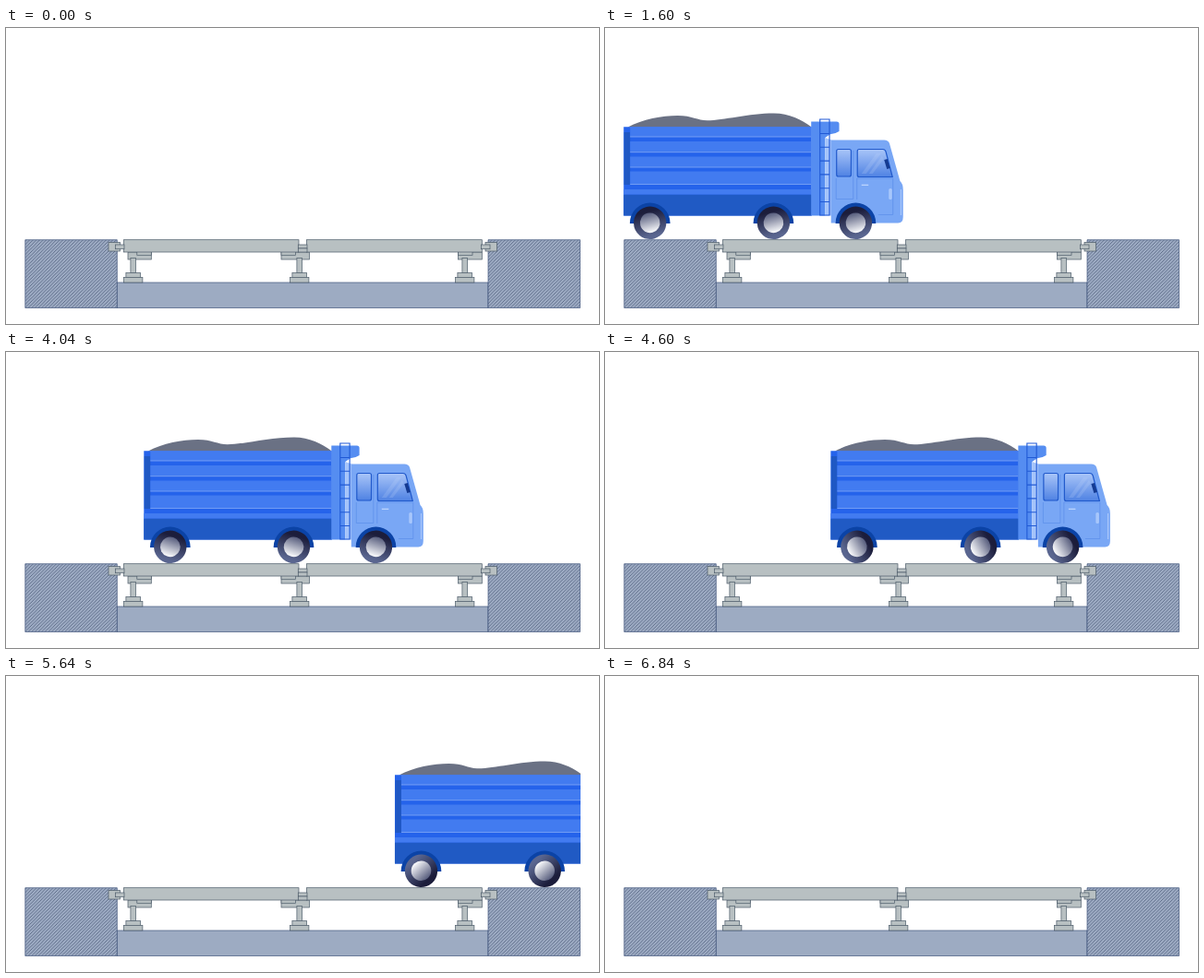
An HTML page for the animation above (7120 ms loop, 642 by 321 pixels).

```html
<!DOCTYPE html>
<html lang="en">
<head>
<meta charset="utf-8">
<title>Weighbridge</title>
<style>
html, body { margin: 0; width: 100%; height: 100%; overflow: hidden; background: #fff; }
svg { display: block; width: 100vw; height: 100vh; }
.steel { fill: #b8c0c2; stroke: #4b5a68; stroke-width: .7; }
</style>
</head>
<body>
<svg viewBox="0 0 642 321">
  <defs>
    <pattern id="hatch" width="3.6" height="3.6" patternUnits="userSpaceOnUse">
      <rect width="3.6" height="3.6" fill="#9fadc5"/>
      <path d="M-1 1L1-1M-1 4.600L4.600-1M2.600 4.600L4.600 2.600" stroke="#40506f" stroke-width=".7"/>
    </pattern>
    <linearGradient id="tyre"><stop offset=".1" stop-color="#5a6690"/><stop offset=".85" stop-color="#1c1d3b"/></linearGradient>
    <linearGradient id="hub"><stop offset=".05" stop-color="#f4f5f8"/><stop offset="1" stop-color="#565c7c"/></linearGradient>
    <linearGradient id="glass" x2="0" y2="1"><stop offset="0" stop-color="#a9c5f8"/><stop offset="1" stop-color="#4f82e3"/></linearGradient>
    <clipPath id="road"><rect x="20" y="80" width="602" height="160"/></clipPath>
  </defs>

  <g stroke="#40547c" stroke-width=".7">
    <path d="M120 276H522V303.500H120Z" fill="#9dabc2"/>
    <path d="M20.800 229.700H120.300V303.500H20.800ZM522 229.700H621.500V303.500H522Z" fill="url(#hatch)"/>
  </g>
  <g id="bridge" class="steel"></g>

  <g clip-path="url(#road)">
    <g id="truck">
      <path d="M147 107.500C163 99 184 95 201 95C217 95 222 100.300 233 100.300C250 100.300 278 92.500 305 92.500C322 92.500 335 99.500 346 107.500Z" fill="#6a7184"/>
      <path d="M142.500 107.200H346V203.500H142.500Z" fill="#2563eb"/>
      <path d="M142.500 180.500H346V203.500H142.500Z" fill="#205ac4"/>
      <path d="M143 113H149.500V170H143Z" fill="#1f58c4"/>
      <g id="slats" fill="#427bf0"></g>
      <path d="M142.500 175H346V180.500H142.500Z" fill="#427bf0"/>
      <path d="M345.500 101.500H373Q375.800 101.500 375.800 104V112Q372 114.800 366 115.200L360.500 119V203.500H345.500Z" fill="#558df1"/>
      <path d="M360.500 119L367.500 121.500V203.500H360.500Z" fill="#a5c4fa"/>
      <path id="ladder" fill="none" stroke="#2059d5" stroke-width="1.100"/>

      <path d="M367 121.500H424.500Q429 121.500 430.200 125L441.700 166Q445 169 445 175V205Q445 211.500 439.500 211.500H367Z" fill="#79a7f5"/>
      <path d="M442.700 175V203" stroke="#a9c7fb" stroke-width="1.200"/>
      <path d="M372.500 163V185.500H391V133M395 163V186M395 163H434V202.500H418" fill="none" stroke="#5e91eb" stroke-width=".8"/>
      <g fill="url(#glass)" stroke="#2059cb" stroke-width="1.200">
        <rect x="373" y="131.500" width="15.700" height="29.500" rx="2"/>
        <path d="M397.500 131.500H423Q425.500 131.500 426.300 134L433.500 161.500H397.500Q395.500 161.500 395.500 159.500V133.500Q395.500 131.500 397.500 131.500Z"/>
      </g>
      <path d="M400 158L416 136H421L405 158ZM408 158L422 139L424 142L412 158Z" fill="#c4d8fb" opacity=".2"/>
      <path d="M424.500 143L428 142L431 152L427.500 153Z" fill="#143a91"/>
      <path d="M400 170.300H407.500" stroke="#c2d8fd" stroke-width="1.200"/>
      <rect x="429.500" y="174" width="3.500" height="12" rx="1.500" fill="#a8c7fb"/>
      <g id="wheels"></g>
    </g>
  </g>
</svg>
<script>
const byId = id => document.getElementById(id);
const rect = (x, y, x2, y2) => `<rect x="${x}" y="${y}" width="${x2 - x}" height="${y2 - y}"/>`;

// Support under the deck: bracket, pad, stem and two foot plates
const support = (mid, left, right, pad) =>
  rect(left, 243, right, 251) + rect(pad, 242, pad + 15.5, 246.3) +
  rect(mid - 2.8, 249.5, mid + 2.8, 266) + rect(mid - 7.8, 265.5, mid + 7.8, 271) +
  rect(mid - 10.2, 270.5, mid + 10.2, 276);

byId('bridge').innerHTML =
  rect(111, 232.5, 123.5, 242) + rect(519, 232.5, 531.5, 242) +
  support(137.7, 132, 157.3, 141.8) + support(317.7, 298, 328.5, 298) + support(496.7, 489.5, 515.3, 489.5) +
  rect(127.5, 229.7, 317, 243) + rect(325.5, 229.7, 515.3, 243) +
  rect(118.5, 235, 128, 239.7) + rect(514.5, 235, 524, 239.7) +
  rect(316.3, 235, 326, 239) + rect(316.3, 239, 326, 243);

byId('slats').innerHTML = [[107.5, 118], [123, 134.7], [139.5, 151], [155.5, 169.5]].map(([y, y2]) =>
  rect(149.5, y, 345.5, y2) + `<path d="M149.5 ${y2}H345.5" stroke="#8db1f6" stroke-width=".7"/>`).join('');

let ladder = 'M355 203V99H365.3V203Z';
for (let y = 114.5; y < 200; y += 14.8) ladder += `M355 ${y}H365.3`;
byId('ladder').setAttribute('d', ladder);

byId('wheels').innerHTML = [171, 304.7, 393.7].map(x => `<g transform="translate(${x} 211.3)">
  <path d="M-21.8 .7V0A21.8 21.8 0 0 1 21.8 0V.7Z" fill="#0b43a6"/>
  <g class="spin"><circle r="17.7" fill="url(#tyre)"/><circle r="10.8" fill="url(#hub)"/></g></g>`).join('');
const spins = document.querySelectorAll('.spin');

const LOOP = 7120, STEP = 40, ARRIVE = 2000, LEAVE = 4000;

function draw(now) {
  const t = Math.floor(now % LOOP / STEP) * STEP;
  const before = Math.min(t - ARRIVE, 0), after = Math.max(t - LEAVE, 0);
  const x = before * .3057 + after * .1698;
  const angle = 285 + (before + after) * .075;
  byId('truck').setAttribute('transform', `translate(${x} 0)`);
  spins.forEach(s => s.setAttribute('transform', `rotate(${angle})`));
}

let start;
function tick(now) {
  start ??= now;
  draw(now - start);
  requestAnimationFrame(tick);
}
draw(0);
requestAnimationFrame(tick);
</script>
</body>
</html>
```
